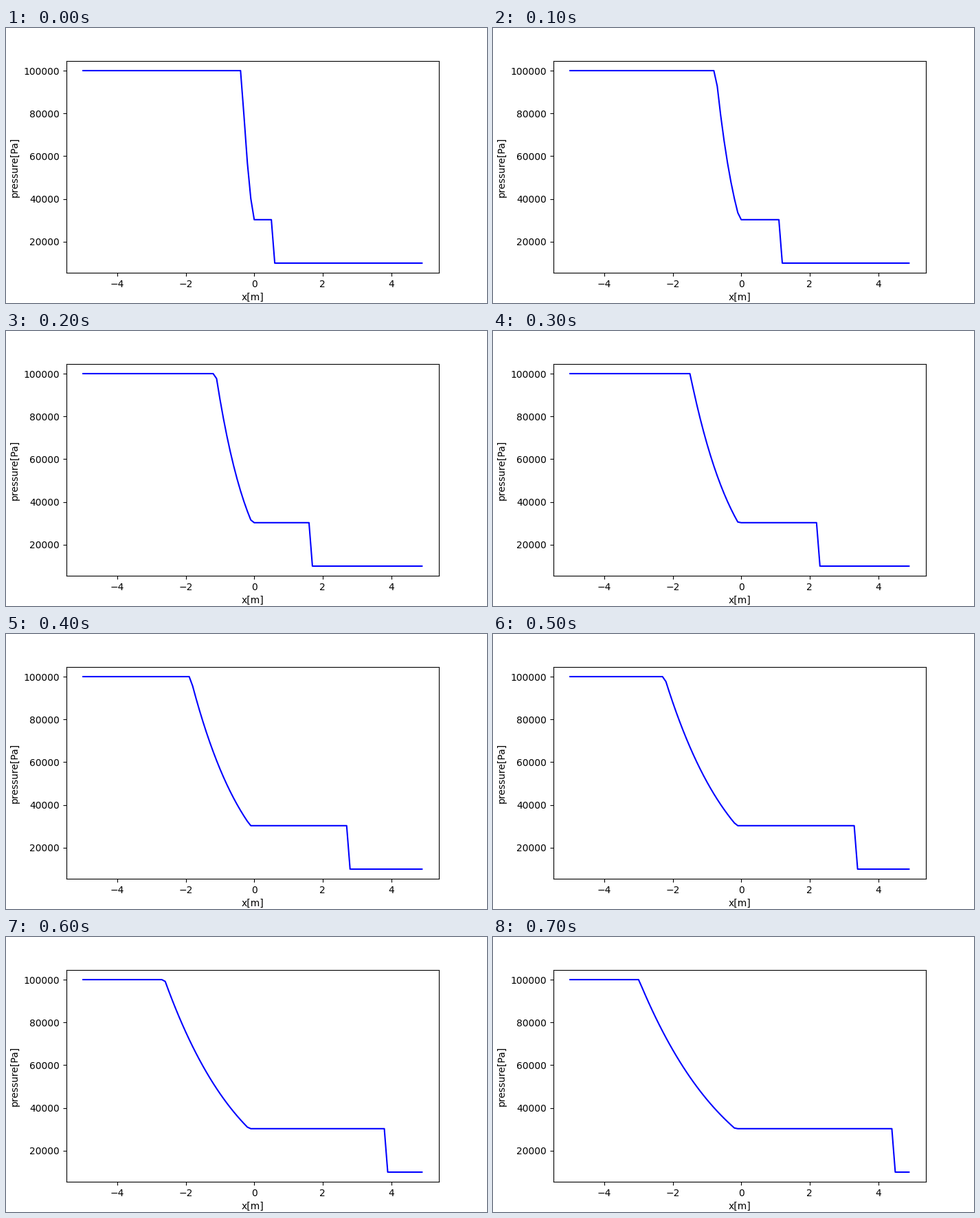
A matplotlib script for the animation above (0.8 s loop, 700x400 px).

```python
import numpy as np
import matplotlib.pyplot as plt
from matplotlib.animation import FuncAnimation

# Shock tube with a diaphragm at x = 0
GAMMA = 1.4
P_LEFT, P_STAR, P_RIGHT = 1e5, 30313.0, 1e4
RHO_LEFT = 1.0
SOUND_LEFT = np.sqrt(GAMMA * P_LEFT / RHO_LEFT)
SHOCK_SPEED = 554.0
TIME_STEP = 1e-3
FRAMES = 8

x = np.arange(-50, 50) / 10


def pressure(t):
    """Pressure along the tube: left state, expansion fan, plateau, shock."""
    velocity = 2 / (GAMMA + 1) * (SOUND_LEFT + x / t)
    ratio = np.maximum(1 - (GAMMA - 1) / 2 * velocity / SOUND_LEFT, 0)
    fan = P_LEFT * ratio ** (2 * GAMMA / (GAMMA - 1))
    return np.where(x > SHOCK_SPEED * t, P_RIGHT, np.clip(fan, P_STAR, P_LEFT))


fig, ax = plt.subplots(figsize=(7, 4), dpi=100)
line, = ax.plot(x, pressure(TIME_STEP), color="blue", linewidth=1.5)
ax.set_xlabel("x[m]")
ax.set_ylabel("pressure[Pa]")


def update(frame):
    line.set_ydata(pressure((frame + 1) * TIME_STEP))
    return line,


animation = FuncAnimation(fig, update, frames=FRAMES, interval=100, repeat=True)
plt.show()
```
